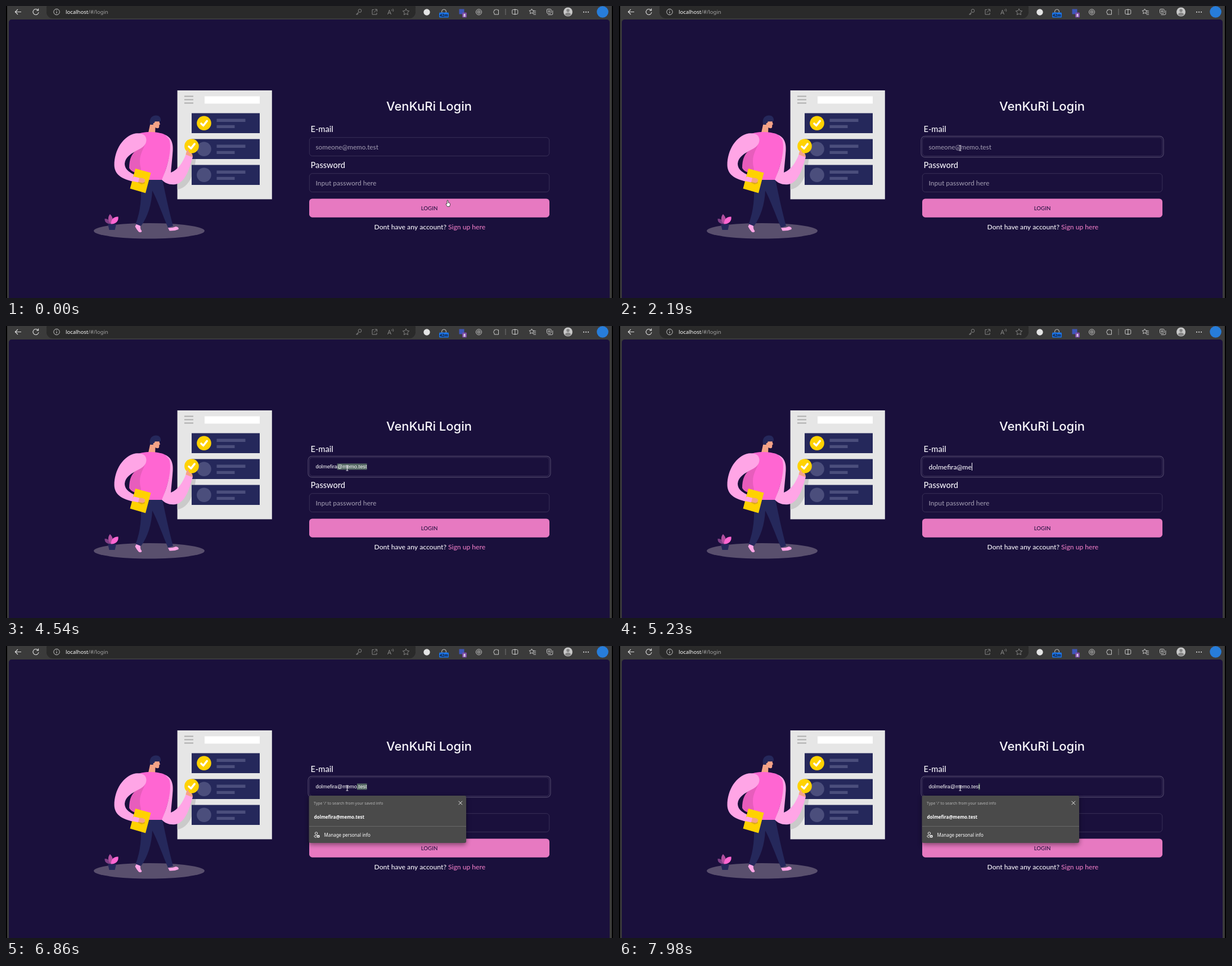
An HTML page with a canvas that plays this animation: 1079x519 px, repeating every 8 s.

```html
<!DOCTYPE html>
<html lang="en">
<head>
<meta charset="utf-8">
<title>Login</title>
<style>
  html, body { margin: 0; width: 100%; height: 100%; overflow: hidden; background: #1a103c; }
  canvas { display: block; width: 1079px; height: 519px; }
</style>
</head>
<body>
<canvas id="stage" width="1079" height="519"></canvas>
<script>
const ctx = document.getElementById('stage').getContext('2d');
const LOOP = 8000;
const TITLE = '"Inter", sans-serif';
const UI = '"Lato", sans-serif';
const SYSTEM = '"Noto Sans", sans-serif';
const PLAIN = '"Liberation Sans", Arial, sans-serif';
const NAVY = '#25285b', SLATE = '#4b4e7c', YELLOW = '#ffd200', SKIN = '#f5a387';
const PINK = '#ff66d2', BLUSH = '#ffa5e6', ROSE = '#e779c1', ICON = '#c9c9c9', DIM = '#858585';
const BORDER = '#473e63', HINT = '#9b95ac', WHITE = '#f9f7fd';
const EMAIL = 'dolmefira@memo.test';

// [time, typed characters, state]
const KEYS = [
  [0, 0, 'hint'], [2280, 1, 'typed'], [2360, 2, 'typed'], [2520, 3, 'typed'],
  [2810, 4, 'typed'], [3040, 5, 'typed'], [3490, 5, 'blink'], [3630, 6, 'typed'],
  [3730, 7, 'typed'], [3910, 8, 'typed'], [4080, 9, 'typed'], [4540, 9, 'preview'],
  [4640, 10, 'preview'], [4910, 11, 'typed'], [4980, 11, 'preview'], [5230, 12, 'typed'],
  [5350, 12, 'preview'], [5590, 13, 'preview'], [5900, 14, 'preview'], [7490, 15, 'typed'],
  [7580, 15, 'preview'], [7780, 17, 'typed'], [7880, 18, 'typed'], [7980, 18, 'preview']
];

function rect(color, x, y, w, h, r = 0) {
  ctx.fillStyle = color;
  ctx.beginPath();
  ctx.roundRect(x, y, w, h, r);
  ctx.fill();
}

function frame(color, x, y, w, h, r, width = 1) {
  ctx.strokeStyle = color;
  ctx.lineWidth = width;
  ctx.beginPath();
  ctx.roundRect(x, y, w, h, r);
  ctx.stroke();
}

function disc(color, x, y, rx, ry = rx) {
  ctx.fillStyle = color;
  ctx.beginPath();
  ctx.ellipse(x, y, rx, ry, 0, 0, 2 * Math.PI);
  ctx.fill();
}

function shape(color, d) {
  ctx.fillStyle = color;
  ctx.fill(new Path2D(d));
}

function stroke(color, d, width = 1) {
  ctx.strokeStyle = color;
  ctx.lineWidth = width;
  ctx.stroke(new Path2D(d));
}

function text(str, x, y, font, color, align = 'left') {
  ctx.font = font;
  ctx.fillStyle = color;
  ctx.textAlign = align;
  ctx.fillText(str, x, y);
  return ctx.measureText(str).width;
}

function ring(color, x, y, r, width = 1) {
  ctx.strokeStyle = color;
  ctx.lineWidth = width;
  ctx.beginPath();
  ctx.arc(x, y, r, 0, 2 * Math.PI);
  ctx.stroke();
}

function star(color, x, y, r) {
  ctx.beginPath();
  for (let i = 0; i < 10; i++) {
    const a = i * Math.PI / 5 - Math.PI / 2, d = i % 2 ? r * 0.48 : r;
    ctx.lineTo(x + d * Math.cos(a), y + d * Math.sin(a));
  }
  ctx.closePath();
  ctx.strokeStyle = color;
  ctx.lineWidth = 1;
  ctx.stroke();
}

function drawBrowser(t) {
  rect('#000', 0, 0, 1079, 519);
  rect('#3b3b3b', 2, 0, 1075, 519);
  rect('#1a103c', 5, 24, 1068, 500, 5);
  rect('#2a2a2a', 72, -8, 656, 30, 11);

  stroke('#e0e0e0', 'M27 10.5H16.5M21 6L16.3 10.5L21 15', 1.1);
  stroke('#e0e0e0', 'M57 7.5A5 5 0 1 0 58 11M57.6 4.5V8H54', 1.1);
  ring(ICON, 90, 10.5, 5.2);
  stroke(ICON, 'M90 9.8V13.3M90 7.3V8.5', 1.1);
  const w = text('localhost', 106, 14, '9.5px ' + SYSTEM, '#fff');
  text('/#/login', 106 + w, 14, '9.5px ' + SYSTEM, '#a3a3a3');

  if (t < 6940) {
    ring(DIM, 629, 8.5, 2.8);
    stroke(DIM, 'M627 10.5L622.5 15H625V13.2H626.5');
  }
  stroke(DIM, 'M654 6.5H651V15H659V12M655.5 6H659.5V10M659 6.5L654 11.5');
  text('A', 678, 15, '11px ' + SYSTEM, DIM);
  stroke(DIM, 'M685.5 6Q687 7.5 685.8 9M687.5 4.8Q690 7.5 688 10', 0.9);
  star(DIM, 711, 10.8, 6);

  disc('#e4e4e4', 748, 11, 5.7);
  ring(ICON, 778.5, 10, 4);
  rect('#1a73e8', 770, 11.5, 17, 9, 1.5);
  text('42m', 778.5, 18.7, 'bold 7px ' + SYSTEM, '#101626', 'center');
  rect('#3d55b8', 805.5, 5.5, 9, 9);
  rect('#7d4ba6', 811, 11.5, 8, 9, 1.5);
  text('8', 815, 18.6, 'bold 7px ' + SYSTEM, '#fff', 'center');
  ring(ICON, 840.5, 10.8, 5);
  ring(ICON, 840.5, 10.8, 2.6);
  disc(ICON, 840.5, 10.8, 1);
  stroke(ICON, 'M868 7H870A1.7 1.7 0 0 1 873 7H875.5V15H868V12.5A1.8 1.8 0 0 1 868 9Z');
  rect('#777', 887.5, 5, 1, 11);
  frame(ICON, 899.8, 6.5, 10, 8, 1.5);
  stroke(ICON, 'M904.8 5V16');
  star(ICON, 934.5, 9.8, 4.8);
  stroke(ICON, 'M937.5 9H942M938 12H942M937.5 15H942');
  frame(ICON, 961.5, 5.5, 7.5, 7.5, 1.5);
  stroke(ICON, 'M963.5 15.5H970.5Q971.8 15.5 971.8 14V8M965.3 7V11.5M963 9.2H967.5');

  disc('#c9c9c9', 999, 10.5, 8);
  disc('#858585', 999, 8, 2.8);
  shape('#858585', 'M993.7 15.5Q994 11.7 999 11.7Q1004 11.7 1004.3 15.5Q999 20 993.7 15.5');
  for (let i = 0; i < 3; i++) disc('#eee', 1027 + i * 4, 10.8, 1);
  disc('#277dda', 1060.5, 10.5, 10.3);
}

function tick(x, y) {
  disc(YELLOW, x, y, 12.8);
  ctx.lineCap = ctx.lineJoin = 'round';
  stroke('#fff', `M${x - 5} ${y + 0.8}L${x - 1.2} ${y + 4.3}L${x + 5.2} ${y - 3.8}`, 3.6);
  ctx.lineCap = 'butt';
  ctx.lineJoin = 'miter';
}

function drawBoard() {
  rect('#e6e6e6', 304.6, 150, 168.2, 193.6);
  for (let i = 0; i < 3; i++) rect('#adadad', 317, 159.5 + i * 6, 16, 2);
  rect('#fff', 353, 160.5, 98, 13);
  shape('#cacaca', 'M304.6 300C316 292 322 276 326 263L338 268C335 293 328 323 304.6 326Z');
  for (let i = 0; i < 3; i++) {
    const y = 190.5 + i * 46;
    rect(NAVY, 330, y, 121, 35.5);
    if (i) disc(SLATE, 352, y + 17.7, 12.8);
    else tick(352, y + 17.7);
    rect(SLATE, 374.5, y + 10, 51, 5.5);
    rect(SLATE, 374.5, y + 21.3, 32, 5.3);
  }
}

function drawPerson() {
  disc('#594f6d', 254.5, 399.7, 98.5, 13.8);

  shape('#7d3f85', 'M187 388C184 384 184 378 175.5 378C175 385 180 387 187 388Z');
  shape('#b14f9f', 'M187 388C179 381 182 373 185 370C190 375 192 382 187 388Z');
  shape(PINK, 'M187 388C186 379 192 374 199.5 374.5C200.5 382 196 387 187 388Z');
  shape(NAVY, 'M181 387.5H196L193.5 398H183.5Z');

  shape(BLUSH, 'M288 394Q295 395 302 392Q308 393 306.5 397Q300 400 290.5 399.5Z');
  shape(BLUSH, 'M232 387L239 391Q238 396 241.5 400Q240.5 403.5 236 401.5Q232 397 229.5 392Z');
  shape(NAVY, 'M239 308H278C284 338 290 365 297 391L288 394C278 370 269 345 260 328C259 352 252 375 240 391L230.5 387.5C239 365 242 340 239 308Z');

  shape(SKIN, 'M257 207L273 201L272.5 206L274 210.5L272.5 211L272 216Q270 218.5 265.5 216L265 227L253 225Z');
  shape(NAVY, 'M256.5 211C254 203 257 195 266 194.5C272 194 276 198 275 204.5C270 206 268 204.5 264.5 205.5L263 211Z');
  disc(SKIN, 263.3, 210, 1.7, 2.2);

  shape(PINK, 'M231 229C242 222 270 223 281 228C295 234 296 248 291 266C287 284 281 298 279 309H238C241 292 235 275 238 255Z');
  shape('#e75dbc', 'M248 243C244 258 234 265 240 290L238 297C230 297 222 294 219 288C219 273 223 260 236 254Z');
  shape(BLUSH, 'M283 229C296 235 298 247 296 264L293 296C306 291 315 277 320 263L332 268C326 290 318 315 301 317C290 318 283 315 277 309C287 286 296 254 290 237Z');
  shape(BLUSH, 'M249.5 238C249.5 228 240 225 230 226.5C208 231 192.5 256 192.5 283C193 301 208 309 235 314L239 304C222 298 211 292 211 280C212 268 223 262 236 255C244 251 249.5 246 249.5 238Z');

  shape(YELLOW, 'M230 289L257.5 296.5L248 332.5L220.5 324.5Z');
  shape('#dda915', 'M224 309L241 317L247 315L245 309L234 305Z');
  shape(SKIN, 'M235 306Q242 304 247 308Q248 313 243 314.5L233 312.5Z');
  shape(BLUSH, 'M227 303L237 305.5L235 313.5L223 311Z');

  tick(330, 249);
  shape(SKIN, 'M319.5 264Q321 257 323 254Q324 259 327 261.5Q332 261 332 268.5L327 267Z');
}

function drawForm(t) {
  text('VenKuRi Login', 752, 186, '500 22px ' + TITLE, WHITE, 'center');
  text('E-mail', 541.5, 223.5, '500 14.6px ' + UI, WHITE);
  text('Password', 541.5, 288, '500 14.6px ' + UI, WHITE);
  for (const y of [233.7, 297.7]) frame(BORDER, 539.3, y, 426.4, 32.9, 5.3, 0.7);
  if (t >= 1090) frame(BORDER, 537, 231.5, 431, 37.3, 7, 1.4);
  text('Input password here', 550.5, 318.5, '500 12px ' + UI, HINT);
  rect(ROSE, 539, 342.4, 427, 33.3, 5.5);
  text('LOGIN', 752.5, 362.5, '500 9.7px ' + UI, '#25103f', 'center');
  const w = text('Dont have any account? ', 654.5, 396.8, '500 12.15px ' + UI, WHITE);
  text('Sign up here', 654.5 + w, 396.8, '500 12.15px ' + UI, ROSE);
}

function drawEmail(t, typed, state) {
  const x = 550.5, head = EMAIL.slice(0, typed);
  let end = 0;
  if (state === 'preview') {
    ctx.font = '9.3px ' + PLAIN;
    const from = ctx.measureText(head).width, to = ctx.measureText(EMAIL).width;
    rect('#566965', x + from, 244.5, to - from, 11);
    text(EMAIL, x, 253.3, '9.3px ' + PLAIN, '#fff');
  } else if (state === 'hint') {
    text('someone@memo.test', x, 254.5, '500 11.7px ' + UI, HINT);
  } else {
    end = text(head, x, 254.5, '500 12px ' + UI, WHITE);
  }
  if (state === 'typed' || (t >= 1090 && t < 2190)) rect(WHITE, Math.round(x + end), 243, 1, 14);
}

function drawPopup() {
  ctx.save();
  ctx.shadowColor = 'rgba(0,0,0,.45)';
  ctx.shadowBlur = 8;
  ctx.shadowOffsetY = 3;
  rect('#4a4a4a', 538.5, 266, 279.5, 84, 3);
  ctx.restore();
  text("Type '/' to search from your saved info", 547, 281.7, '6.9px ' + SYSTEM, '#b5b5b5');
  stroke('#e6e6e6', 'M804.5 275.7L811 282.2M811 275.7L804.5 282.2');
  text(EMAIL, 547.5, 306.7, 'bold 8px ' + SYSTEM, '#fff');
  rect('#696969', 539, 320, 279, 1);
  ring('#eee', 551.5, 333, 2.2);
  stroke('#eee', 'M552 337H549Q547.6 337 547.7 338.5Q548.5 340.4 551.5 340.5');
  rect('#eee', 552.5, 336, 5, 4.5, 1);
  rect('#4a4a4a', 554, 337.7, 2, 1.2);
  text('Manage personal info', 565.5, 338.7, '8px ' + SYSTEM, '#fff');
}

function drawBeam(x, y) {
  stroke('#e4e1ea', `M${x - 2} ${y - 4.5}H${x + 2}M${x} ${y - 4.5}V${y + 4.5}M${x - 2} ${y + 4.5}H${x + 2}`);
}

function drawPointer(t, state) {
  if (t < 70) {
    const hand = 'M784 352V346Q785 344 786 346V349.5L789 350.5Q790 351 789.5 353L788.5 356.5H784.5L782 352.5Q781.7 350.7 784 352Z';
    shape('#fff', hand);
    stroke('#222', hand, 0.8);
    return;
  }
  if (state === 'typed' || state === 'blink') return;
  // seven discrete steps between 270 and 680 ms
  const step = t < 270 ? 0 : Math.min(7, 1 + Math.floor((t - 270) / 68.3));
  const ease = 1 - (1 - step / 7) ** 1.7;
  drawBeam(Math.round(717 - 111 * ease) + 0.5, Math.round(305 - 53 * ease) + 0.5);
}

function render(now) {
  const t = now % LOOP;
  const [, typed, state] = KEYS.findLast(key => key[0] <= t);
  drawBrowser(t);
  drawBoard();
  drawPerson();
  drawForm(t);
  drawEmail(t, typed, state);
  if (t >= 6860) drawPopup();
  drawPointer(t, state);
}

const start = performance.now();
function loop() {
  render(performance.now() - start);
  requestAnimationFrame(loop);
}
loop();
</script>
</body>
</html>
```
